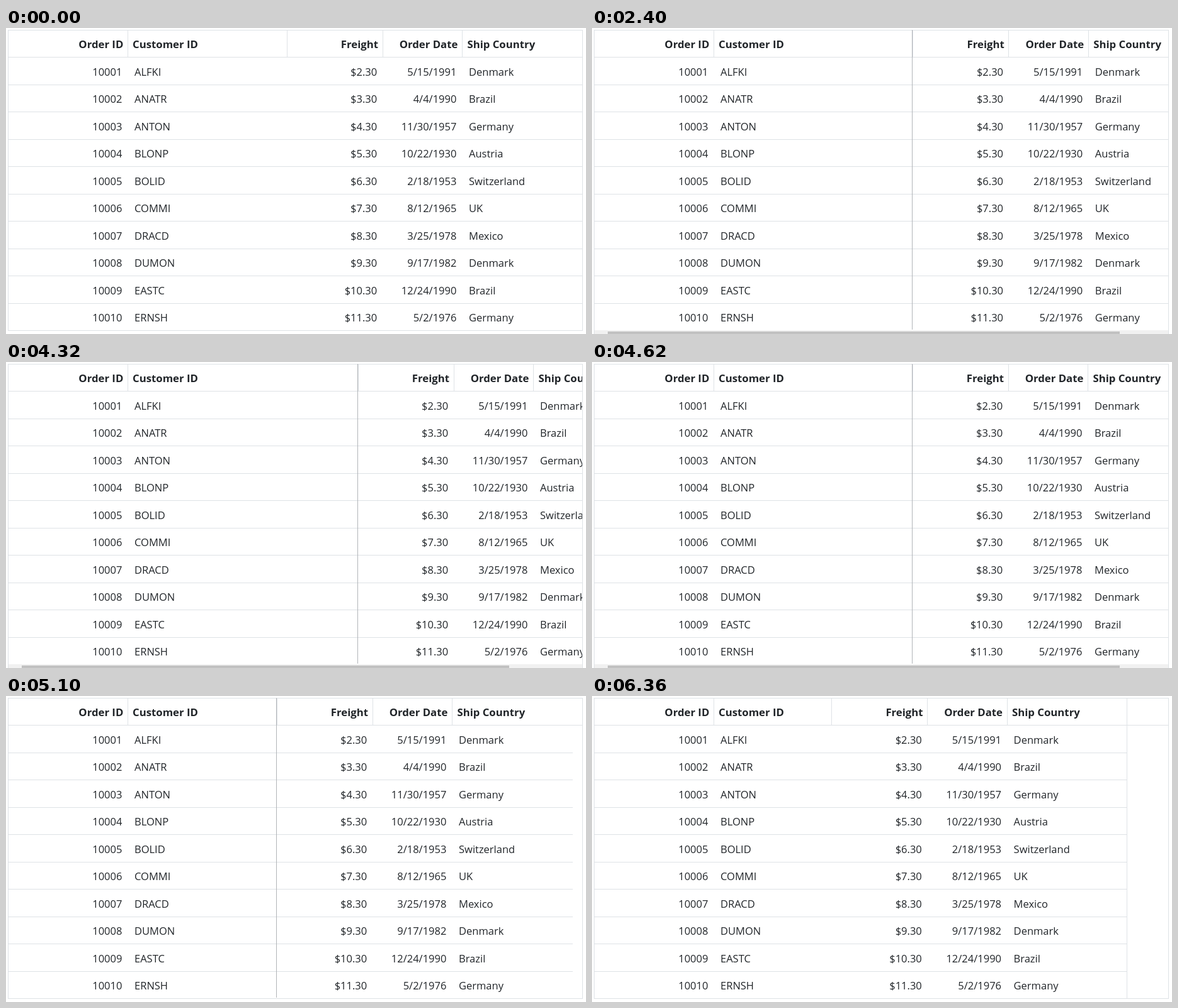
Write an HTML page with a canvas that moves like this. It is 921 px wide and 487 px high and loops after 8.34 s.

```html
<!DOCTYPE html>
<html lang="en">
<head>
<meta charset="utf-8">
<title>Column resize</title>
<style>
  html, body { margin: 0; width: 100%; height: 100%; overflow: hidden; background: #fff; }
  canvas { display: block; }
</style>
</head>
<body>
<canvas id="stage" width="921" height="487"></canvas>
<script>
const ctx = document.getElementById('stage').getContext('2d');
const LOOP = 8340, STEP = 60;
const LEFT = 3, TOP = 3, RIGHT = 915, BOTTOM = 481, HEADER = 46, ROW = 43.5;
const BORDER = '#dee2e6', INK = '#212529';
const BODY_FONT = '16.5px "Open Sans", "Noto Sans", sans-serif';
const HEAD_FONT = 'bold 16.75px "Open Sans", "Noto Sans", sans-serif';
const DRAG_START = 1980, DRAG_END = 6360;

const customers = ['ALFKI', 'ANATR', 'ANTON', 'BLONP', 'BOLID', 'COMMI', 'DRACD', 'DUMON', 'EASTC', 'ERNSH'];
const dates = ['5/15/1991', '4/4/1990', '11/30/1957', '10/22/1930', '2/18/1953',
  '8/12/1965', '3/25/1978', '9/17/1982', '12/24/1990', '5/2/1976'];
const countries = ['Denmark', 'Brazil', 'Germany', 'Austria', 'Switzerland', 'UK', 'Mexico'];

// [time, x] of the dragged column edge
const path = [[0, 446], [2040, 446], [2700, 563], [2760, 563], [2820, 568], [4260, 568],
  [4320, 559], [4920, 459], [5100, 430], [5340, 398], [5520, 380.6], [LOOP, 380.6]];

function edgeAt(time) {
  const t = Math.floor(time / STEP) * STEP;
  const i = path.findIndex(p => p[0] > t);
  const [t0, x0] = path[i - 1], [t1, x1] = path[i];
  return x0 + (x1 - x0) * (t - t0) / (t1 - t0);
}

function rect(x, y, w, h, color) {
  ctx.fillStyle = color;
  ctx.fillRect(x, y, w, h);
}
const hLine = (x0, x1, y) => rect(x0, y, Math.floor(x1) - x0 + 1, 1, BORDER);
const vLine = (x, y0, y1) => rect(Math.floor(x), y0, 1, y1 - y0 + 1, BORDER);

function text(str, x, y, align) {
  ctx.fillStyle = INK;
  ctx.textAlign = align;
  ctx.fillText(str, x, y);
}

function drawCells(edge) {
  ctx.font = HEAD_FONT;
  text('Order ID', 186.3, 32, 'right');
  text('Customer ID', 201, 32, 'left');
  text('Freight', edge + 145, 32, 'right');
  text('Order Date', edge + 271.4, 32, 'right');
  text('Ship Country', edge + 286.4, 32, 'left');

  ctx.font = BODY_FONT;
  customers.forEach((customer, i) => {
    const y = Math.round(75.5 + ROW * i);
    text(String(10001 + i), 184.4, y, 'right');
    text(customer, 204, y, 'left');
    text('$' + (2.3 + i).toFixed(2), edge + 143.2, y, 'right');
    text(dates[i], edge + 269.4, y, 'right');
    text(countries[i % countries.length], edge + 289, y, 'left');
  });
}

function drawScrollbar(contentWidth) {
  const view = RIGHT - LEFT;
  rect(LEFT + 1, BOTTOM, view - 1, 6, '#f1f1f1');
  rect(25, BOTTOM + 2, Math.floor((view - 42) * view / contentWidth), 4, '#c1c1c1');
}

function draw(time) {
  const edge = edgeAt(time);
  const end = edge + 469;
  const scrolls = end > RIGHT;
  const dragging = time >= DRAG_START && time < DRAG_END;

  rect(0, 0, 921, 487, '#fff');
  ctx.save();
  ctx.beginPath();
  ctx.rect(LEFT, TOP, RIGHT - LEFT, BOTTOM - TOP + 1);
  ctx.clip();
  for (let i = 1; i < 10; i++) hLine(LEFT, end, Math.round(HEADER + ROW * i));
  hLine(LEFT, RIGHT, HEADER);
  [193, edge, edge + 152, edge + 278.4].forEach(x => vLine(x, TOP, HEADER));
  if (time >= DRAG_END) vLine(end, TOP, BOTTOM);
  drawCells(edge);
  ctx.restore();

  hLine(LEFT, RIGHT, TOP);
  if (scrolls) drawScrollbar(end - LEFT);
  else hLine(LEFT, RIGHT, BOTTOM);
  const sideEnd = scrolls ? 486 : BOTTOM;
  vLine(LEFT, TOP, sideEnd);
  vLine(RIGHT, TOP, sideEnd);

  if (dragging) {
    const width = time < 2100 ? 2 : 1;
    rect(Math.floor(edge) - width, TOP, width, BOTTOM - TOP - 1, width > 1 ? '#a9b4be' : '#b1b4b8');
  }
}

const start = performance.now();
function tick() {
  draw((performance.now() - start) % LOOP);
  requestAnimationFrame(tick);
}
tick();
</script>
</body>
</html>
```
